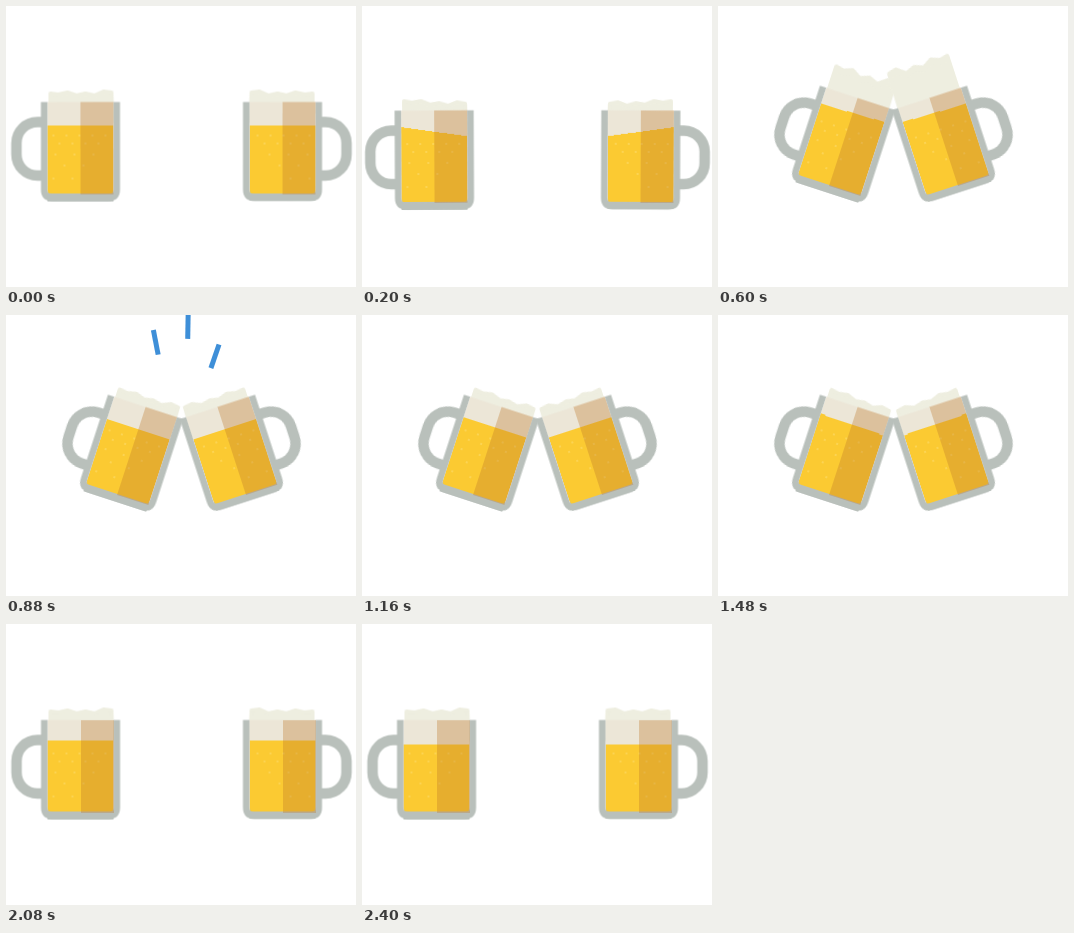
Recreate the animation shown at these times as an HTML page without scripts. Size 350x281 px, loop 2.68 s.

```html
<!DOCTYPE html>
<html lang="en">
<head>
<meta charset="utf-8">
<title>Cheers</title>
<style>
html, body { margin: 0; width: 100%; height: 100%; overflow: hidden; background: #fff; }
svg { display: block; width: 100vw; height: 100vh; }
.mug, .beer, .foam, .floor, .shade, .spark, .trail { animation: 2680ms linear infinite; }

.mug { animation-name: swing; --rise: -9px; }
.right .mug { --rise: -24px; }
.beer { animation-name: slosh; fill: #fbca32; }
.foam { animation-name: froth; transform-origin: 0 -49.5px; fill: #eeeee0; stroke: #eeeee0; stroke-width: 4; stroke-linejoin: round; }
.floor { animation-name: lift; fill: #b9c0bb; }
.shade { animation-name: stretch; transform-origin: 0 -49.5px; fill: #bb762a; fill-opacity: .33; }
.spark { animation-name: spark; stroke: #3e8fd8; stroke-width: 5; stroke-dasharray: 25 300; }
.trail { animation-name: trail; fill: none; stroke: #3e8fd8; stroke-width: 4; stroke-dasharray: var(--dash) 300; }

/* wind-up, dip, clink, drop, return */
@keyframes swing {
  0%, 77.6%, 100% { transform: translate(74.5px, 145.5px) rotate(0deg); }
  6% { transform: translate(70px, 151px) rotate(-2deg); animation-timing-function: ease-in-out; }
  14.93% { transform: translate(111px, 203px) rotate(28.5deg); }
  20.9% { transform: translate(114.5px, 139px) rotate(19deg); }
  22.4%, 59.7% { transform: translate(124.3px, 139px) rotate(18deg); animation-timing-function: ease-in; }
  65.67% { transform: translate(94.3px, 205.3px) rotate(18deg); animation-timing-function: ease-out; }
}
@keyframes slosh {
  0%, 32.84%, 89.55%, 100% { transform: translateY(-25.5px) skewY(0deg); }
  14.93% { transform: translateY(-31px) skewY(16deg); }
  20.9% { transform: translateY(-36px) skewY(0deg); }
  26.87% { transform: translateY(-27px) skewY(-8deg); }
  55.22%, 59.7% { transform: translateY(-31px) skewY(1deg); }
  65.67% { transform: translateY(-34.5px) skewY(0deg); }
  77.6%, 83.58% { transform: translateY(-29.5px) skewY(0deg); }
}
@keyframes froth {
  0%, 32.84%, 77.6%, 89.55%, 100% { transform: none; }
  14.93% { transform: translateY(2px) skewY(7deg); }
  20.9%, 65.67% { transform: translateY(var(--rise)) scaleY(2); }
  26.87% { transform: skewY(3deg); }
  55.22%, 59.7% { transform: translateY(2px) skewY(3deg); }
  83.58% { transform: translateY(-4px); }
}
@keyframes lift {
  0%, 61.2%, 73.1%, 100% { transform: none; }
  65.67% { transform: translateY(-8px); }
}
@keyframes stretch {
  0%, 61.2%, 73.1%, 100% { transform: none; }
  65.67% { transform: scaleY(1.065); }
}
@keyframes spark {
  0%, 22.4% { stroke-dashoffset: 25; }
  43.3%, 100% { stroke-dashoffset: -107; }
}
@keyframes trail {
  0%, 8.96% { stroke-dashoffset: var(--dash); }
  14.93% { stroke-dashoffset: var(--shown); }
  19.4%, 100% { stroke-dashoffset: -140; }
}
.long { --dash: 49; --shown: -31; }
.short { --dash: 22; --shown: -27; }
</style>
</head>
<body>
<svg viewBox="0 0 350 281">
  <defs>
    <clipPath id="inside"><path d="M-33-49.5H33V43H-33Z"/></clipPath>
    <path id="head" fill="#ece6d7" d="M-33-49.5H33V43H-33Z"/>
    <g id="glass" fill="none" stroke="#b9c0bb">
      <path stroke-width="6.5" d="M-36.3-49.5V38Q-36.3 46.3-28 46.3H28Q36.3 46.3 36.3 38V-49.5"/>
      <path stroke-width="10.5" d="M-38-29.5H-43A21 21 0 0 0-64-8.5V3A21 21 0 0 0-43 24H-38"/>
    </g>
    <g id="bubbles" fill="none" stroke="#ffe58a" stroke-opacity=".5" stroke-width="2" stroke-linecap="round">
      <path stroke-dasharray="0 13" d="M-27-16H30M-21-8H30"/>
      <path stroke-dasharray="0 19" d="M-25 3H22M-16 14H12M-27 27H0"/>
    </g>
  </defs>

  <path class="spark" d="M0 0V-100" transform="translate(160 80) rotate(-11)"/>
  <path class="spark" d="M0 0V-100" transform="translate(181 65) rotate(1)"/>
  <path class="spark" d="M0 0V-100" transform="translate(191.5 92) rotate(19)"/>

  <g class="left">
    <path class="trail long" d="M3 230Q14 243 30 245Q55 252 76 240Q96 230 106 212"/>
    <path class="trail short" d="M2 234Q10 246 22 252Q32 258 43 260"/>
    <g class="mug">
      <path class="foam" d="M-30-30V-58L-22-57L-13-59L-4-56L5-58L14-56L23-60L31-59L32-30Z"/>
      <use href="#head"/>
      <g clip-path="url(#inside)"><path class="beer" d="M-34 0H34V100H-34Z"/></g>
      <use href="#bubbles"/>
      <path class="floor" d="M-33 42H33V50H-33Z"/>
      <use href="#glass"/>
      <path class="shade" d="M0-49.5H33V43H0Z"/>
    </g>
  </g>
  <g class="right" transform="translate(351) scale(-1 1)">
    <path class="trail long" d="M3 230Q14 243 30 245Q55 252 76 240Q96 230 106 212"/>
    <path class="trail short" d="M2 234Q10 246 22 252Q32 258 43 260"/>
    <g class="mug">
      <path class="foam" d="M-30-30V-58L-22-57L-13-59L-4-56L5-58L14-56L23-60L31-59L32-30Z"/>
      <use href="#head"/>
      <g clip-path="url(#inside)"><path class="beer" d="M-34 0H34V100H-34Z"/></g>
      <use href="#bubbles"/>
      <path class="floor" d="M-33 42H33V49H-33Z"/>
      <use href="#glass"/>
      <path class="shade" d="M-33-49.5H0V43H-33Z"/>
    </g>
  </g>
</svg>
</body>
</html>
```
